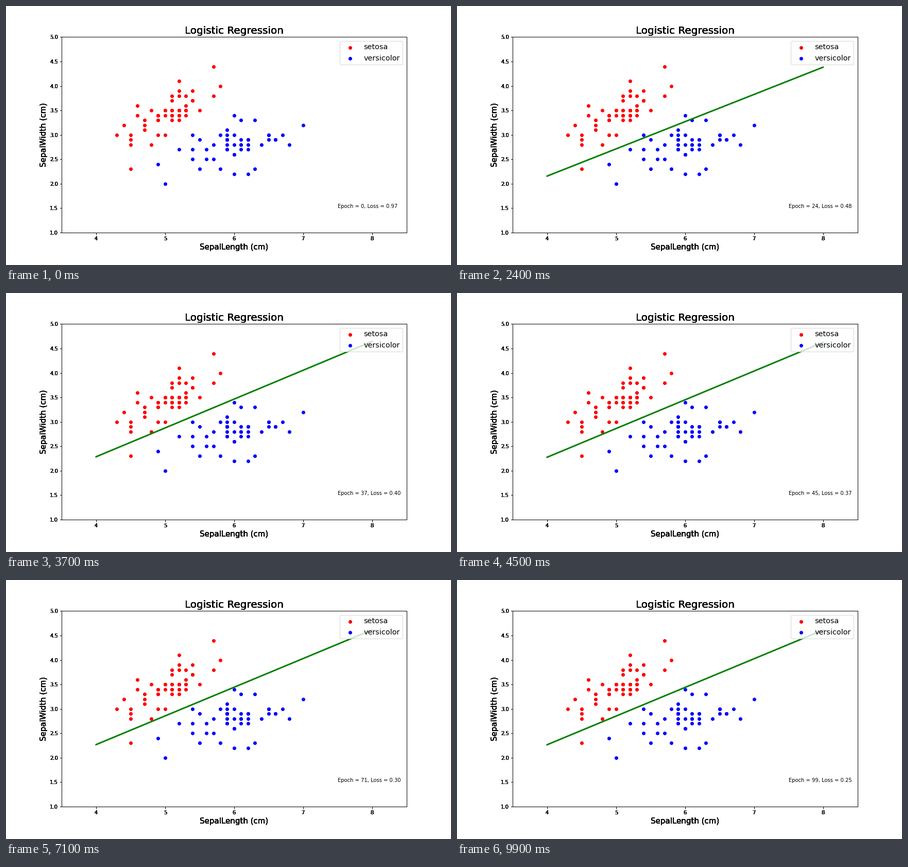
Animation, 864 px wide and 504 px high, one loop 10 s. Source, as a matplotlib script:

```python
import matplotlib.pyplot as plt
import numpy as np
from matplotlib.animation import FuncAnimation
from matplotlib.path import Path

EPOCHS = 100
LAYERS = 6  # stacked axes give the heavy lettering

# Outer points of each cloud, in order around it
SETOSA = [(4.5, 2.3), (4.3, 3.0), (4.4, 3.2), (4.6, 3.6), (5.2, 4.1),
          (5.7, 4.4), (5.8, 4.0), (5.7, 3.8), (5.5, 3.5), (5.0, 3.0)]
VERSICOLOR = [(5.0, 2.0), (4.9, 2.4), (5.2, 2.7), (5.4, 3.0), (6.0, 3.4),
              (6.3, 3.3), (7.0, 3.2), (6.8, 2.8), (6.3, 2.3), (6.2, 2.2),
              (6.0, 2.2), (5.5, 2.3)]


def cloud(outline, mean, spread, corr, seed, count=50):
    """Outline plus a seeded normal core, all on a 0.1 cm lattice."""
    sx, sy = spread
    cov = [[sx * sx, corr * sx * sy], [corr * sx * sy, sy * sy]]
    rng = np.random.default_rng(seed)
    core = rng.multivariate_normal(mean, cov, 400).round(1)
    core = core[Path(outline).contains_points(core)]
    return np.vstack([outline, core[:count - len(outline)]]).T


def loss(n):
    return 1 / (1.62 + 0.024 * n - 0.59 * np.exp(-n / 13))


def scale(n):
    """Steady growth of the separating weights."""
    return 2.26 * np.log(1 + n / 53) - 0.015


def swing(n):
    """Overshoot of each descent step, flipping sign as it dies away."""
    size = 0.037 / (1 + 0.19 * n) * np.exp(-(n / 28) ** 4)
    return (-1) ** n * size - 0.001 * np.exp(-n / 35)


def boundary(n, x):
    s, t = scale(n), swing(n)
    bias = 0.085 * s + t - 0.015
    w_len = -0.586 * s + 5.47 * t
    w_wid = s + 3.1 * t
    return -(bias + w_len * x) / w_wid


def make_axes(fig, first):
    ax = fig.add_subplot(111, facecolor="white" if first else "none")
    ax.set(xlim=(3.5, 8.5), ylim=(1, 5), xticks=range(4, 9),
           yticks=np.arange(1, 5.1, 0.5))
    ax.set_title("Logistic Regression", fontsize=20)
    ax.set_xlabel("SepalLength (cm)", fontsize=15)
    ax.set_ylabel("SepalWidth (cm)", fontsize=15)
    return ax


plt.rcParams["font.family"] = "DejaVu Sans"
fig = plt.figure(figsize=(12, 7), dpi=72)
fig.subplots_adjust(left=0.125, right=0.9, bottom=0.125, top=0.88)
ax = [make_axes(fig, i == 0) for i in range(LAYERS)][-1]

ax.scatter(*cloud(SETOSA, (5.0, 3.35), (0.27, 0.25), 0.7, seed=4),
           color="red", label="setosa")
ax.scatter(*cloud(VERSICOLOR, (5.95, 2.8), (0.42, 0.24), 0.5, seed=7),
           color="blue", label="versicolor")
ax.legend(loc="upper right", fontsize="x-large")

ends = np.array([4.0, 8.0])
line, = ax.plot([], [], color="green", lw=3)
note = ax.text(7.5, 1.5, "", fontsize=10)


def update(n):
    line.set_data(ends, boundary(n, ends))
    note.set_text(f"Epoch = {n}, Loss = {loss(n):.2f}")
    return line, note


anim = FuncAnimation(fig, update, frames=EPOCHS, interval=100,
                     repeat=True, repeat_delay=0)
plt.show()
```
